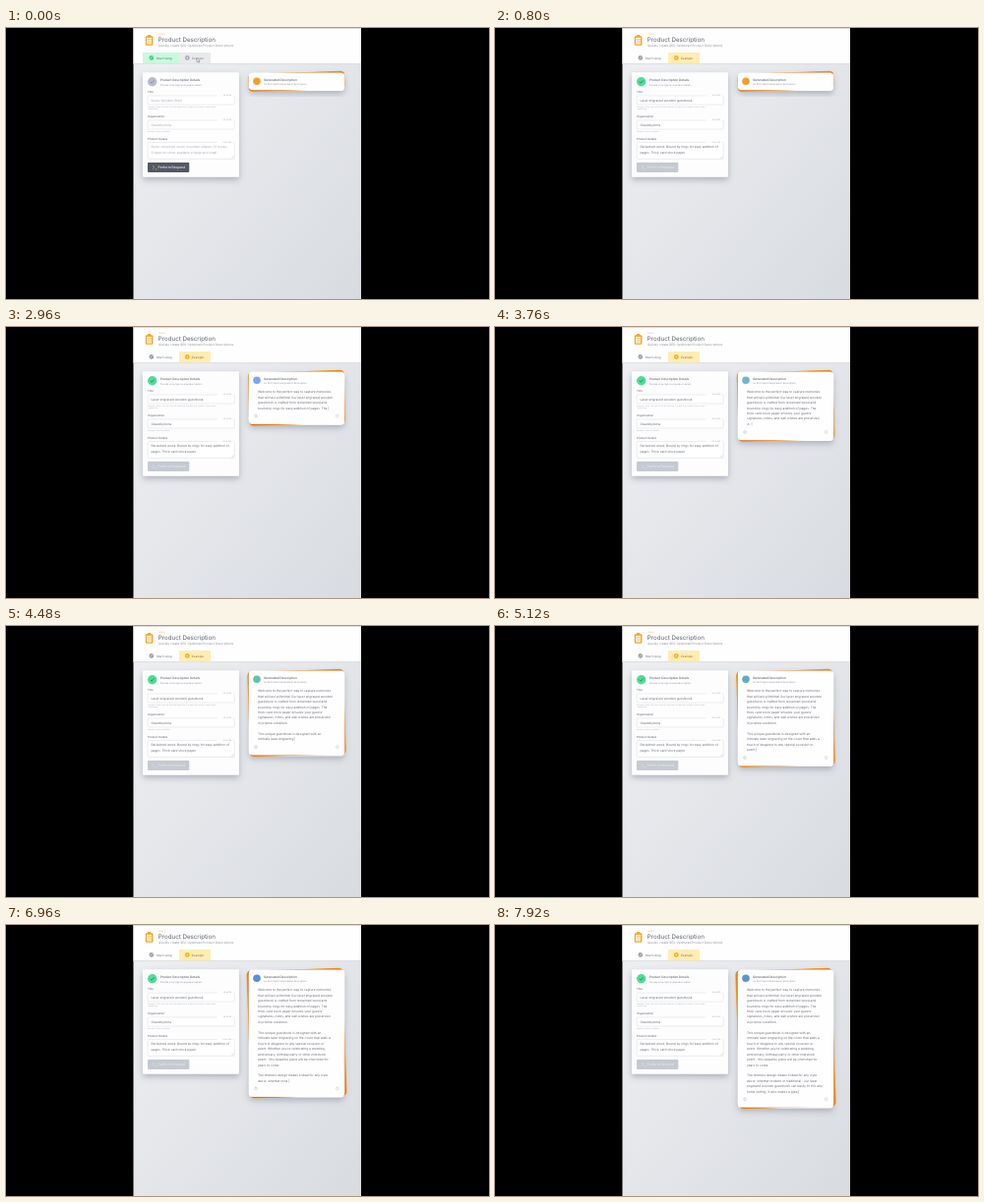
An HTML page that plays this animation: 491 px wide and 276 px high, repeating every 8000 ms.

```html
<!DOCTYPE html>
<html lang="en">
<head>
<meta charset="utf-8">
<title>Product Description</title>
<style>
  html, body { margin: 0; width: 100%; height: 100%; overflow: hidden; background: #000; }
  svg { display: block; width: 491px; height: 276px; }
  text { font-family: Inter, "Open Sans", sans-serif; text-rendering: geometricPrecision; white-space: pre; }
</style>
</head>
<body>
<svg id="stage" viewBox="0 0 491 276">
  <defs>
    <linearGradient id="page" x2="1" y2="1">
      <stop stop-color="#eff0f2"/><stop offset=".5" stop-color="#e4e6ea"/><stop offset="1" stop-color="#d8dbe0"/>
    </linearGradient>
    <filter id="shadow" x="-20%" y="-20%" width="140%" height="150%">
      <feDropShadow dx="0" dy="3" stdDeviation="3" flood-color="#59606d" flood-opacity=".38"/>
    </filter>
    <clipPath id="clip"><rect x="129.5" width="231.5" height="276"/></clipPath>
  </defs>
  <g clip-path="url(#clip)">
    <rect x="129" width="232" height="276" fill="url(#page)"/>
    <rect x="129" width="232" height="36.5" fill="#fefefe"/>
    <rect x="129" width="232" height=".8" fill="#d9d4cc"/>
    <rect x="129" y="36.3" width="232" height=".7" fill="#d4d7dc"/>
    <g id="head"></g>
    <g id="tabs"></g>
    <rect x="139" y="45.3" width="98" height="106.4" rx="1.2" fill="#fdfdfe" filter="url(#shadow)"/>
    <g id="form"></g>
    <g id="result"></g>
  </g>
</svg>
<script>
const $ = id => document.getElementById(id);
const LOOP = 8000, STEP = 80, SWITCH = 160;

const story = [
  "Welcome to the perfect way to capture memories",
  "that will last a lifetime! Our laser engraved wooden",
  "guestbook is crafted from reclaimed wood and",
  "bound by rings for easy addition of pages. The",
  "thick card stock paper ensures your guests'",
  "signatures, notes, and well wishes are preserved",
  "in pristine condition.",
  "",
  "This unique guestbook is designed with an",
  "intricate laser engraving on the cover that adds a",
  "touch of elegance to any special occasion or",
  "event. Whether you're celebrating a wedding,",
  "anniversary, birthday party or other milestone",
  "event - this beautiful piece will be cherished for",
  "years to come.",
  "",
  "The timeless design makes it ideal for any style",
  "decor, whether modern or traditional - our laser",
  "engraved wooden guestbook can easily fit into any",
  "home setting. It also makes a great"
];

// time, characters typed
const typing = [[1360, 0], [1760, 46], [2960, 191], [4480, 376], [5840, 538], [6960, 673], [7920, 788]];
// time, r, g, b of the status icon
const tint = [[0, 240, 160, 50], [800, 240, 160, 50], [1760, 75, 185, 185], [2960, 125, 165, 245],
  [4480, 95, 195, 175], [5840, 95, 145, 230], [6960, 85, 145, 220], [7920, 90, 150, 205]];

function at(keys, t) {
  let i = 0;
  while (i < keys.length - 2 && t > keys[i + 1][0]) i++;
  const a = keys[i], b = keys[i + 1];
  const k = Math.max(0, Math.min(1, (t - a[0]) / (b[0] - a[0])));
  return a.slice(1).map((v, j) => v + (b[j + 1] - v) * k);
}

const text = (x, y, size, fill, s, weight = 400, anchor = "start") =>
  `<text x="${x}" y="${y}" font-size="${size}" fill="${fill}" font-weight="${weight}" text-anchor="${anchor}">${s}</text>`;
const rect = (x, y, w, h, r, fill, more = "") =>
  `<rect x="${x}" y="${y}" width="${w}" height="${h}" rx="${r}" fill="${fill}" ${more}/>`;
const dot = (x, y, r, fill) => `<circle cx="${x}" cy="${y}" r="${r}" fill="${fill}"/>`;
const line = (d, color, w) =>
  `<path d="${d}" fill="none" stroke="${color}" stroke-width="${w}" stroke-linecap="round" stroke-linejoin="round"/>`;

$("head").innerHTML =
  rect(141.8, 8.2, 7.6, 9.6, 1, "#f5a524") + rect(143.2, 9.8, 4.8, 6.8, .3, "#fff") +
  rect(143.9, 7, 3.4, 2.4, .7, "#f5a524") +
  [11.3, 13.1, 14.9].map(y => dot(144.4, y, .5, "#f5a524") + line(`M145.6 ${y}h1.8`, "#f5a524", .7)).join("") +
  text(155, 6.7, 2, "#f5b04a", "TOOLS", 500) +
  text(154.8, 13.5, 6.2, "#5b5f68", "Product Description") +
  text(155, 19.2, 3.15, "#8b8f98", "Quickly create SEO Optimized Product Descriptions");

function tabs(done) {
  const [a, b] = done ? ["#9a9ea8", "#f5ad1d"] : ["#3ccf82", "#a7abb4"];
  return (done ? rect(176, 25, 32, 11.3, .6, "#feedb4")
               : rect(139, 25, 37, 11.3, .6, "#cbf8de") + rect(176, 25, 32, 11.3, .6, "#e9eaec")) +
    dot(147.8, 30.4, 2.3, a) + line("M147 31.2l1.7-1.7", "#fff", .6) +
    text(153, 31.5, 2.95, done ? "#7d818a" : "#3f8f68", "Start Using", 500) +
    dot(184.3, 30.4, 2.3, b) + dot(184.3, 30.4, .8, done ? "#feedb4" : "#e9eaec") +
    text(189, 31.5, 2.95, done ? "#a07c28" : "#858994", "Example", 500) +
    (done ? "" : `<path d="M194 30.5v4.2l1-.9 .8 1.6 .8-.4-.8-1.5h1.3z" fill="#fff" stroke="#555" stroke-width=".4"/>`);
}

function field(y, h, label, lines, hint, tag, ink) {
  return text(144, y - 2.7, 2.8, "#6f737c", label, 500) +
    rect(144.2, y, 88, h, 1, "#fff", 'stroke="#d3d6dc" stroke-width=".45"') +
    rect(214.5, y - 1, 16, 2, 0, "#fdfdfe") +
    text(229.3, y + .2, 1.9, "#a0a4ae", tag, 400, "end") +
    lines.map((s, i) => text(147.4, y + 5.7 + i * 5.5, 3.2, ink, s)).join("") +
    hint.map((s, i) => text(144.2, y + h + 2.6 + i * 2.8, 1.75, "#a6aab3", s)).join("");
}

function form(done) {
  const ink = done ? "#666a73" : "#a4a8b1";
  const label = done ? "#e6e8ed" : "#f4f4f5";
  return dot(148.7, 54.8, 4.7, done ? "#4fdd98" : "#b9bdc8") +
    line("M147 55l1.2 1.2 2.3-2.6", done ? "#23704b" : "#737987", .7) +
    text(156.8, 54.3, 3.1, "#5b5f68", "Product Description Details", 500) +
    text(156.8, 58.6, 2.3, "#9498a1", "Provide a few high level product details") +
    field(69, 9, "Title", [done ? "Laser engraved wooden guestbook" : "Rustic Wooden Shelf"],
      ["Examples: Rustic Wooden Shelf, Wooden Bear Toy, Oak Tray, Leather coaster, hand", "crafted mug"],
      "60 of 100", ink) +
    field(94, 9, "Organization", [done ? "Gravelbyloma" : "Gravelbyloma"],
      ["Examples: Business, Maker"], "60 of 100", ink) +
    field(116.5, 17, "Product Details", done
      ? ["Reclaimed wood. Bound by rings for easy addition of", "pages. Thick card stock paper"]
      : ["Rustic reclaimed wood, mountain shapes, 12 hooks,", "3 steps on silver, available in large and small"],
      [], "60 of 500", ink) +
    line("M229.5 132.5l1.8-1.8M230.7 132.6l.7-.7", "#a6aab3", .3) +
    rect(144, 137, 42.3, 9.9, .8, done ? "#c5c9d1" : "#535965") +
    line("M149.3 140.3l1.5 1.5-1.5 1.5M152 143.8h1", done ? label : "#f0b968", .6) +
    text(154.6, 143.2, 3.4, label, "Perform Request", 500);
}

function result(t) {
  let left = Math.round(at(typing, t)[0]);
  const shown = [];
  for (const s of story) {
    if (left <= 0) break;
    shown.push(s.slice(0, left));
    left -= s.length + 1;
  }
  const n = shown.length, bottom = n ? 77.4 + 5.42 * n : 63.3;
  const h = bottom - 45.4, mid = 45.4 + h / 2;
  const back = (deg, fill) =>
    rect(246.7, 45.4, 97.6, h, 4, fill, `transform="rotate(${deg} 295.5 ${mid})"`);
  const color = `rgb(${at(tint, t).map(Math.round)})`;
  let out = rect(247, 46, 97, h, 4, "#fff", 'filter="url(#shadow)"') +
    back(-2.1, "#f59a1c") + back(-1.2, "#d97318") +
    rect(246.7, 45.4, 97.6, h, 4, "#fefefe") +
    dot(255, 54.3, 3.8, color) +
    text(262, 53.9, 3.15, "#5b5f68", "Generated Description", 500) +
    text(262, 58.3, 2.4, "#9498a1", "An SEO Optimized product description");
  shown.forEach((s, i) => {
    const caret = i === n - 1 ? " |" : "";
    out += text(256, (67.2 + i * 5.45).toFixed(2), 3.2, "#666a73", s + caret);
  });
  if (n) {
    const y = bottom - 8.4;
    out += `<circle cx="254" cy="${y}" r="1.3" fill="none" stroke="#a9adb6" stroke-width=".5"/>` +
      rect(335.6, y - 1.3, 2.2, 2.6, .4, "none", 'stroke="#b2b6be" stroke-width=".4"');
  }
  return out;
}

let last = -1;
function draw(now) {
  const t = Math.floor((now % LOOP) / STEP) * STEP;
  if (t !== last) {
    const done = t >= SWITCH;
    $("tabs").innerHTML = tabs(done);
    $("form").innerHTML = form(done);
    $("result").innerHTML = result(t);
    last = t;
  }
  requestAnimationFrame(draw);
}
draw(performance.now());
</script>
</body>
</html>
```
